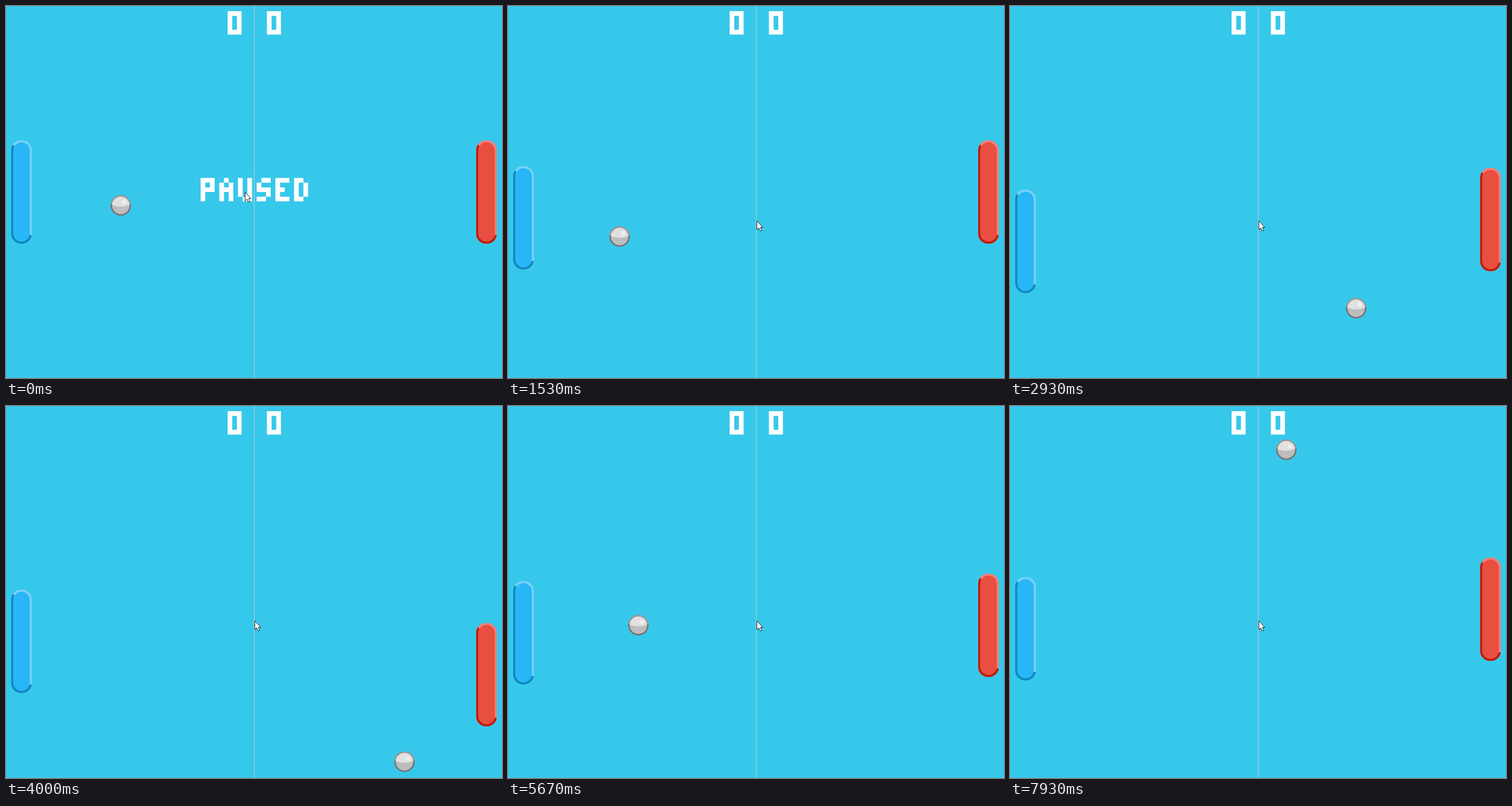
Animation, 864 px wide and 648 px high, one loop 8 s. Source, as an HTML page with a canvas:

```html
<!DOCTYPE html>
<html lang="en">
<head>
<meta charset="utf-8">
<title>Paddle game</title>
<style>
html, body { margin: 0; width: 100%; height: 100%; overflow: hidden; background: #36c8eb; }
canvas { display: block; }
</style>
</head>
<body>
<canvas id="stage" width="864" height="648" aria-label="Paddle game, score 0 to 0"></canvas>
<script>
const g = document.getElementById('stage').getContext('2d');
const LOOP = 8000, STEP = 200 / 3, RESUME = 600;
const PADDLE_SPEED = 0.24, PADDLE_TOP = 234;
const FIELD = { left: 62, right: 802, top: 18, bottom: 631 };

// Ball velocity in px/ms before and after each paddle hit
const SERVE = { t: 612, x: 200, y: 347.5 };
const LEGS = [[-0.295, 0.0293], [0.2919, 0.0892], [-0.2802, 0.1427], [0.25, -0.2015]];

// Key presses: when a paddle sets off and where its top stops
const BLUE = [[1345, 320], [5605, 272], [6150, 311], [6450, 260], [7000, 298]];
const RED = [[2225, 189], [2545, 442], [3733, 292], [7030, 380], [7447, 264]];

const GLYPHS = {
  P: '### #.# ### #.. #..',
  A: '.#. #.# ### #.# #.#',
  U: '#.# #.# #.# #.# .##',
  S: '.## #.. ### ..# ##.',
  E: '### #.. ##. #.. ###',
  D: '##. #.# #.# #.# ##.',
  0: '### #.# #.# #.# ###'
};

const clamp = (v, lo, hi) => Math.min(hi, Math.max(lo, v));

function paddleTop(moves, t) {
  let y = PADDLE_TOP;
  for (const [from, goal] of moves) {
    const reach = Math.max(0, t - from) * PADDLE_SPEED;
    y += clamp(goal - y, -reach, reach);
  }
  return y;
}

function bounce(y) {
  if (y > FIELD.bottom) return 2 * FIELD.bottom - y;
  if (y < FIELD.top) return 2 * FIELD.top - y;
  return y;
}

function ballAt(now) {
  let { t, x, y } = SERVE;
  for (const [vx, vy] of LEGS) {
    const wall = vx < 0 ? FIELD.left : FIELD.right;
    const hit = t + (wall - x) / vx;
    const dt = clamp(now, t, hit) - t;
    y = bounce(y + vy * dt);
    if (now < hit) return [x + vx * dt, y];
    x = wall;
    t = hit;
  }
  return [x, y];
}

function pointerAt(t) {
  if (t < 330) return [416, 324];
  const k = clamp((t - RESUME) / 300, 0, 1);
  return [415 + 18 * k, 324 + 50 * k];
}

function pixelText(text, x, y) {
  const u = 8.14;
  g.beginPath();
  [...text].forEach((ch, n) => {
    GLYPHS[ch].split(' ').forEach((row, r) => {
      [...row].forEach((dot, c) => {
        if (dot === '#') g.rect(x + (n * 4 + c) * u, y + r * u, u, u);
      });
    });
  });
  g.fillStyle = '#fff';
  g.fill();
}

function shape(points) {
  g.beginPath();
  points.forEach(p => g.lineTo(...p));
  g.closePath();
}

function pill(inset, radius, color) {
  g.beginPath();
  g.roundRect(inset, inset, 36 - 2 * inset, 180 - 2 * inset, radius);
  g.fillStyle = color;
  g.fill();
}

function paddle(x, y, fill, light, dark) {
  g.save();
  g.translate(x, Math.round(y));
  pill(0, 17, light);
  g.save();
  shape([[0, 8], [5, 8], [5, 165], [36, 165], [36, 180], [0, 180]]);
  g.clip();
  pill(0, 17, dark);
  g.restore();
  pill(3.5, 14.5, fill);
  g.restore();
}

function disc(x, y, r, color, from = 0, to = Math.PI * 2) {
  g.beginPath();
  g.arc(x, y, r, from, to);
  g.fillStyle = color;
  g.fill();
}

function ball(x, y) {
  g.save();
  g.translate(x, y);
  disc(0, 0, 17.8, '#757170');
  disc(0, 0, 17.8, '#a09a98', Math.PI * 1.04, Math.PI * 1.96);
  disc(0, 0, 15.2, '#bdbdbd');
  g.beginPath();
  g.arc(0, 0, 15.2, Math.PI * 1.02, Math.PI * 1.98);
  g.quadraticCurveTo(0, 5, -15.2, -1);
  g.fillStyle = '#e0e0e0';
  g.fill();
  disc(6, -6, 4, '#eeeeee');
  g.restore();
}

function pointer(x, y) {
  g.save();
  g.translate(Math.round(x) + 0.5, Math.round(y) + 0.5);
  shape([[0, 0], [0, 15], [3.5, 12], [6, 17.5], [8.5, 16.5], [6.2, 11], [10.3, 11]]);
  g.fillStyle = '#fff';
  g.strokeStyle = '#1c2226';
  g.fill();
  g.stroke();
  g.restore();
}

// The picture advances 15 times a second once play resumes
function snap(t) {
  if (t < 330) return 0;
  if (t < RESUME) return 330;
  return RESUME + Math.floor((t - RESUME + 4) / STEP) * STEP;
}

function draw(t) {
  g.fillStyle = '#36c8eb';
  g.fillRect(0, 0, 864, 648);
  g.fillStyle = '#c8c8c8';
  g.fillRect(432, 0, 1, 648);
  pixelText('0', 386, 9);
  pixelText('0', 454.5, 9);
  paddle(9, paddleTop(BLUE, t), '#29b6f6', '#7bd0f6', '#0f88bd');
  paddle(819, paddleTop(RED, t), '#e84f41', '#f77f74', '#bd1c0c');
  ball(...ballAt(t));
  if (t < RESUME) pixelText('PAUSED', 339, 299.6);
  pointer(...pointerAt(t));
}

const start = performance.now();
function tick() {
  draw(snap((performance.now() - start) % LOOP));
  requestAnimationFrame(tick);
}
tick();
</script>
</body>
</html>
```
